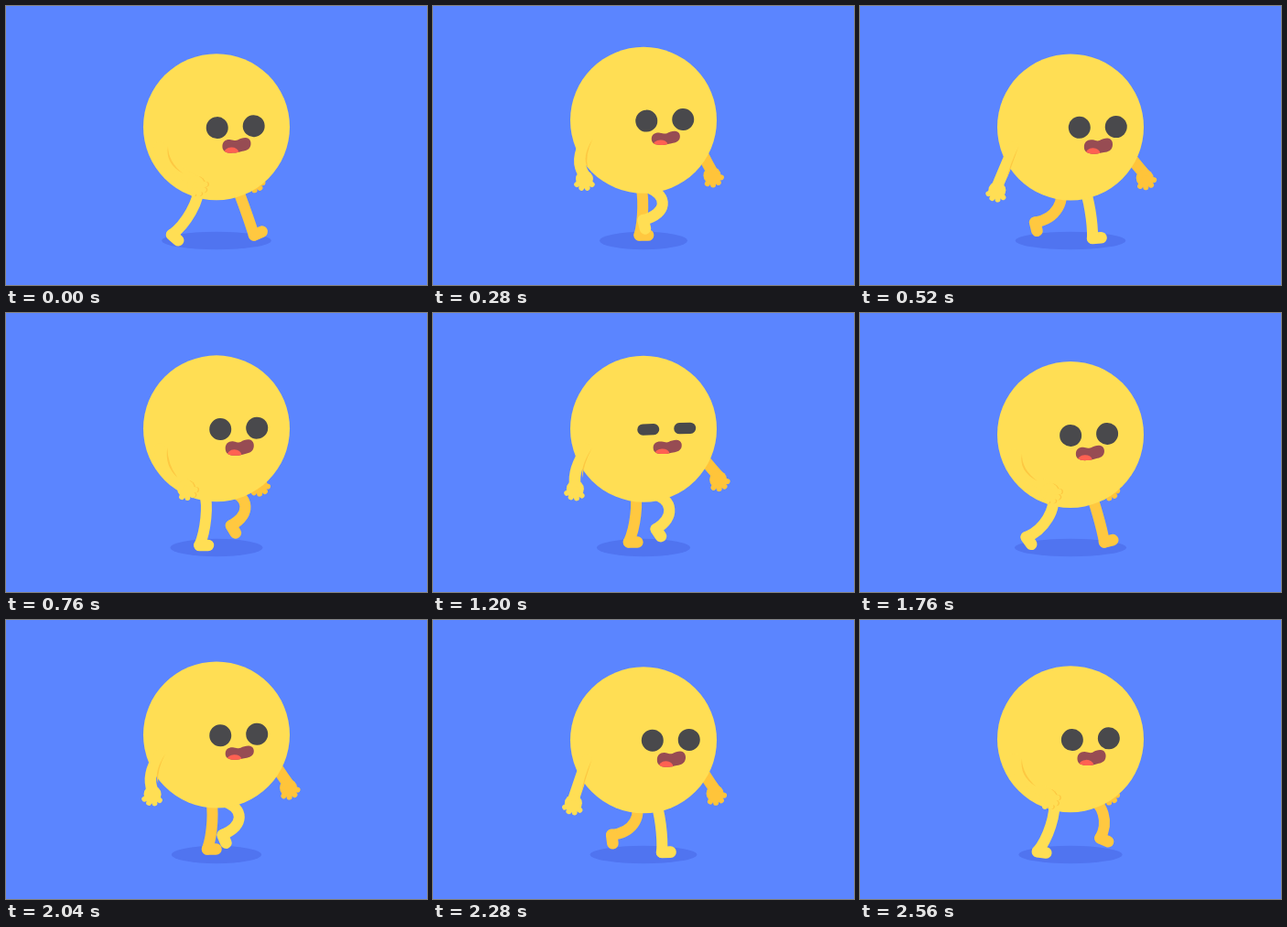
Animation, 460 px wide and 305 px high, one loop 2.6 s. Source, as an HTML page with a canvas:

```html
<!DOCTYPE html>
<html lang="en">
<head>
<meta charset="utf-8">
<title>Walking ball</title>
<style>
html, body { margin: 0; width: 100%; height: 100%; overflow: hidden; background: #5b85ff; }
canvas { display: block; }
</style>
</head>
<body>
<canvas id="stage" width="460" height="305"></canvas>
<script>
const ctx = document.getElementById('stage').getContext('2d');
const LOOP = 2600, STEP = 40, CYCLE = LOOP / 3;
const SKY = '#5b85ff', SHADOW = '#5074f0', NEAR = '#ffde54', FAR_ARM = '#ffc43a', FAR_LEG = '#ffc840';
const SHADE = '#fdc842', EYE = '#49494c', MOUTH = '#974c53', TONGUE = '#ff6152';
const FLOOR = 254, BACK = 181, STRIDE = 86, LEG_LENGTH = 60;

const wave = (phase, peak) => Math.cos(2 * Math.PI * (phase - peak));
const radians = degrees => degrees * Math.PI / 180;

// Heel position and foot angle: the foot swings forward, then carries the body
function footPose(phase) {
  phase -= Math.floor(phase);
  const u = phase * 2 % 1;
  if (phase < .5) {
    return {
      x: BACK + STRIDE * u * u * (2 - u),
      y: FLOOR - 4 * (1 - u) ** 4 - 20 * Math.sqrt(Math.sin(Math.PI * u ** 1.3)),
      angle: 90 - 280 * (u - .42) ** 2
    };
  }
  return {
    x: BACK + STRIDE * (1 - .75 * u - .25 * u ** 4),
    y: FLOOR - 4 * u ** 16,
    angle: 40 * u ** 16 - 24 * (1 - u) ** 8
  };
}

function ellipse(x, y, rx, ry, color) {
  ctx.fillStyle = color;
  ctx.beginPath();
  ctx.ellipse(x, y, rx, ry, 0, 0, 2 * Math.PI);
  ctx.fill();
}

function stroke(color, width, trace) {
  ctx.strokeStyle = color;
  ctx.lineWidth = width;
  ctx.lineCap = ctx.lineJoin = 'round';
  ctx.beginPath();
  trace();
  ctx.stroke();
}

// The leg keeps its length, so the knee bows out as the heel nears the hip
function leg(phase, dx, dy, color) {
  const { x, y, angle } = footPose(phase);
  const hipX = 228.5 - 18.5 * wave(phase, .02), hipY = 198;
  const cx = x - hipX, cy = y - hipY, chord = Math.hypot(cx, cy);
  const bow = Math.max(0, LEG_LENGTH - chord) + .27 * Math.max(0, -cx);
  const bx = bow * cy / chord, by = -bow * cx / chord;
  ctx.save();
  ctx.translate(dx, dy);
  stroke(color, 12, () => {
    ctx.moveTo(hipX, hipY);
    ctx.bezierCurveTo(hipX + .2 * cx + bx, hipY + .2 * cy + by,
      hipX + .7 * cx + bx, hipY + .7 * cy + by, x, y);
  });
  stroke(color, 12.6, () => {
    ctx.moveTo(x, y);
    ctx.lineTo(x + 9.5 * Math.cos(radians(angle)), y + 9.5 * Math.sin(radians(angle)));
  });
  ctx.restore();
}

function hand(x, y, angle, color) {
  ellipse(x, y, 9.5, 9.5, color);
  stroke(color, 6, () => {
    for (let i = -1.5; i <= 1.5; i++) {
      const a = radians(angle - i * 36);
      ctx.moveTo(x, y);
      ctx.lineTo(x + 10.2 * Math.cos(a), y + 10.2 * Math.sin(a));
    }
  });
}

function upperArm(sx, sy, hx, hy, bend, color) {
  stroke(color, 12.5, () => {
    ctx.moveTo(sx, sy);
    ctx.quadraticCurveTo((sx + hx) / 2 + bend, (sy + hy) / 2, hx, hy - 4);
  });
}

function farArm(phase, y) {
  const c = wave(phase, .49);
  const hx = 293.5 + 23 * c, hy = y + 64 - (c > 0 ? 14 : 5) * c * c;
  upperArm(287, y + 21, hx, hy, 0, FAR_ARM);
  hand(hx, hy, 66, FAR_ARM);
}

function nearArm(phase, y) {
  const c = wave(phase, .015);
  const hx = 176.5 + 31 * c, hy = y + 65.5 + 3.5 * wave(phase, .63);
  const bend = -10 - 9 * wave(phase, .12), angle = 80 - 28 * c;

  // Finger outlines show only where the hand lies on the body
  ctx.save();
  ctx.beginPath();
  ctx.arc(230, y, 80, 0, 2 * Math.PI);
  ctx.clip();
  hand(hx + 1.4, hy, angle, SHADE);
  ctx.restore();
  upperArm(168, y + 22, hx, hy, bend, NEAR);
  hand(hx, hy, angle, NEAR);

  // Crease along the inner edge of the arm
  const x0 = 175 + 2 * c, y0 = y + 21;
  const x1 = 176 + .58 * (hx - 177), y1 = hy - 12;
  const mx = (x0 + x1) / 2 + bend / 2, my = (y0 + y1) / 2 + 2;
  ctx.fillStyle = SHADE;
  ctx.beginPath();
  ctx.moveTo(x0, y0);
  ctx.quadraticCurveTo(mx, my, x1, y1);
  ctx.quadraticCurveTo(mx - 3.5, my + 2, x0, y0);
  ctx.fill();
}

function mouth(height) {
  ctx.save();
  ctx.scale(1, height / 16);
  ctx.beginPath();
  ctx.moveTo(-15.5, 8.5);
  ctx.bezierCurveTo(-15.5, 2.5, -11, 0, -6, 1);
  ctx.bezierCurveTo(-3, 1.6, -1, 2.8, 1.5, 1.8);
  ctx.bezierCurveTo(4, .2, 7, -.5, 10, -.5);
  ctx.bezierCurveTo(14.5, -.5, 16.5, 4, 15.5, 8);
  ctx.bezierCurveTo(14.5, 12.5, 11, 14, 6, 14.5);
  ctx.bezierCurveTo(2, 15.2, 0, 16, -4, 16);
  ctx.bezierCurveTo(-11, 16, -15.5, 14, -15.5, 8.5);
  ctx.fillStyle = MOUTH;
  ctx.fill();
  ctx.clip();
  ellipse(-6, 15.7, 8, 6, TONGUE);
  ctx.restore();
}

function face(phase, y, time) {
  const open = Math.min(1, Math.abs(time - 1210) / 125);
  const eyeHeight = 12 + 12 * open * open * (3 - 2 * open);
  ctx.save();
  ctx.translate(254.6 + 5.2 * wave(phase, .615), y);
  ctx.rotate(radians(-2 + wave(phase, .62)));
  ctx.fillStyle = EYE;
  for (const side of [-20, 20]) {
    ctx.beginPath();
    ctx.roundRect(side - 12, -eyeHeight / 2, 24, eyeHeight, eyeHeight / 2);
    ctx.fill();
  }
  ctx.translate(.2, 12.8);
  mouth(15.5 + 1.5 * wave(phase, .75));
  ctx.restore();
}

function draw(time) {
  const phase = time / CYCLE;
  const bob = 4.2 * (1 + wave(2 * phase, .108));
  const y = 124.7 + bob;
  ctx.fillStyle = SKY;
  ctx.fillRect(0, 0, 460, 305);
  ellipse(230, 256.5, 47.8 + 1.6 * bob, 9.7, SHADOW);
  farArm(phase, y);
  leg(phase + .5, 4, -3.5, FAR_LEG);
  leg(phase, 0, 0, NEAR);
  ellipse(230, y, 80, 80, NEAR);
  face(phase, y, time);
  nearArm(phase, y);
}

const start = performance.now();
function tick() {
  const time = Math.floor((performance.now() - start) % LOOP / STEP) * STEP;
  draw(time < 2 * STEP ? 0 : time);
  requestAnimationFrame(tick);
}
tick();
</script>
</body>
</html>
```
